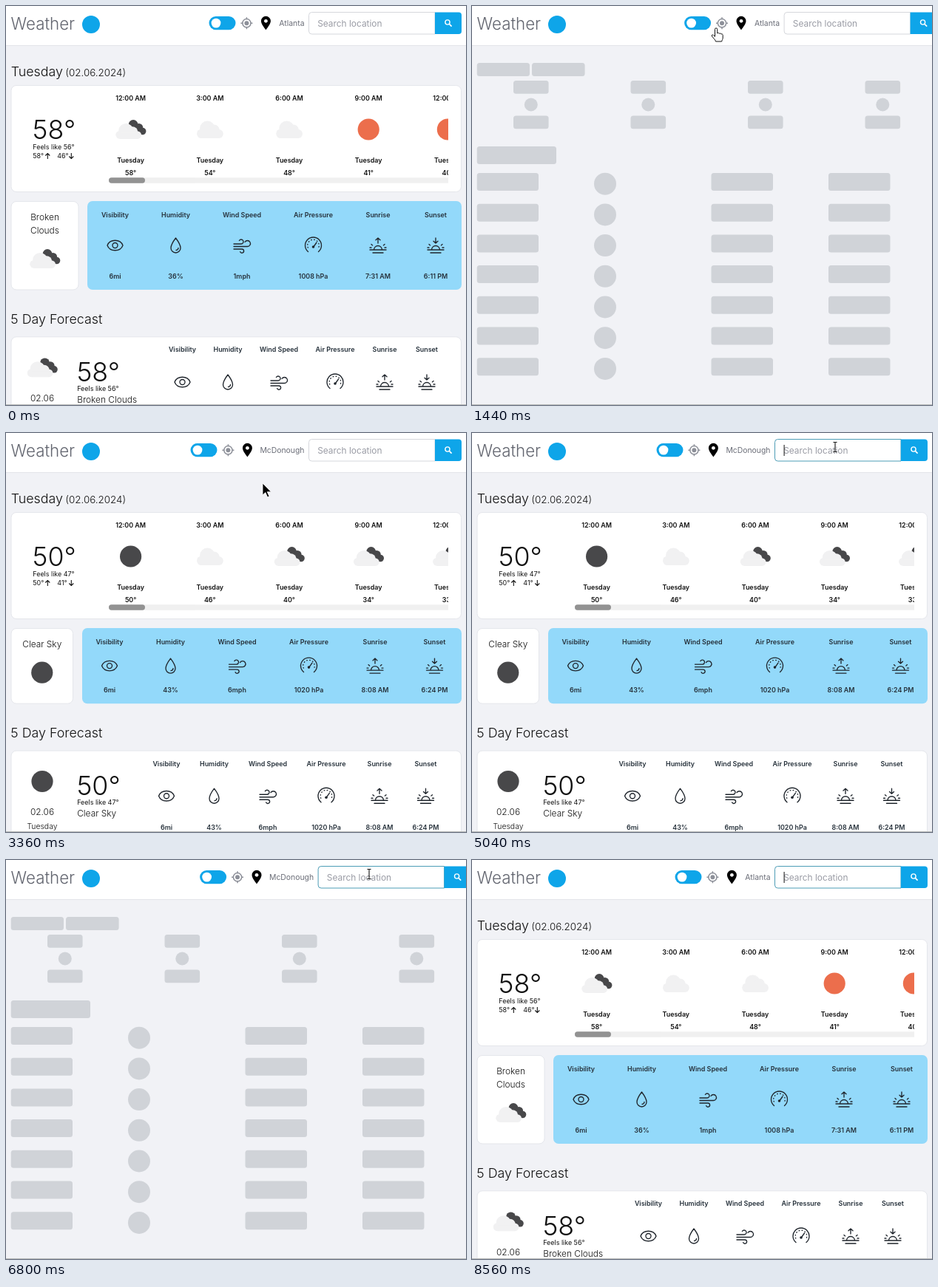
Recreate the animation shown at these times as an HTML page. Size 622x540 px, loop 8640 ms.

```html
<!DOCTYPE html>
<html lang="en">
<head>
<meta charset="utf-8">
<title>Weather</title>
<style>
html, body { margin: 0; width: 100%; height: 100%; overflow: hidden; background: #f1f2f6; }
svg { display: block; font-family: Inter, Roboto, sans-serif; }
.big { font-size: 35.7px; font-weight: 300; }
.h1 { font-size: 22.3px; font-weight: 300; }
.h2 { font-size: 17.85px; font-weight: 300; }
.date { font-size: 13.4px; font-weight: 300; }
.base { font-size: 11.9px; font-weight: 300; }
.field { font-size: 11.9px; }
.sm { font-size: 10.4px; }
.light { font-size: 10.4px; font-weight: 300; }
.xs { font-size: 8.93px; }
.bold { font-size: 8.93px; font-weight: 600; }
.mid { text-anchor: middle; }
.line { fill: none; stroke: #20262d; stroke-width: 1.35; stroke-linecap: round; stroke-linejoin: round; }
.card { fill: #fff; stroke: #e4e6eb; stroke-width: 1; }
</style>
</head>
<body>
<svg id="stage" width="622" height="540" viewBox="0 0 622 540"></svg>
<script>
const LOOP = 8640, STEP = 80, BLUE = '#0ea5e9';
const SKELETON = [[1280, 2240], [6560, 7040]];
const LOCAL = [2960, 7280];            // second city is shown
const FOCUS = 4960;
const KEYS = [5200, 5360, 5520, 5680, 5840, 5920, 6080];
const MENU = [6320, 6560];
const CARET_OFF = [[6800, 7280], [7760, 8320]];
const PATH = [
  [80, 455, 530], [560, 350, 62], [720, 346, 56], [960, 344, 52], [1280, 330, 30],
  [2160, 330, 30], [2320, 338, 36], [2720, 347, 68], [3440, 347, 68],
  [3840, 440, 10], [4160, 491, 19], [7200, 491, 19], [8080, 548, 556]
];

const rect = (x, y, w, h, r, fill, more = '') =>
  `<rect x="${x}" y="${y}" width="${w}" height="${h}" rx="${r}" fill="${fill}" ${more}/>`;
const dot = (x, y, r, fill) => `<circle cx="${x}" cy="${y}" r="${r}" fill="${fill}"/>`;
const text = (x, y, cls, s, fill = '#111') => `<text x="${x}" y="${y}" class="${cls}" fill="${fill}">${s}</text>`;
const at = (x, y, body) => `<g transform="translate(${x} ${y})">${body}</g>`;
const card = (x, y, w, h) => `<rect class="card" x="${x}" y="${y}" width="${w}" height="${h}" rx="7"/>`;
const line = d => `<path class="line" d="${d}"/>`;

// Weather pictures, centred on 0,0
const cloud = fill => dot(-11.5, 5.7, 6.3, fill) + dot(-3.5, -1.2, 10.2, fill) + dot(5.5, 1, 7.5, fill) +
  dot(12, 6, 6, fill) + rect(-11.5, 3, 23.5, 9, 0, fill);
const DARK = '#48484a', PALE = '#f1f1f2';
const sky = {
  sun: dot(0, 0, 14.6, '#ec6e4c'),
  night: dot(0, 0, 14.6, DARK),
  cloud: cloud(PALE),
  broken: dot(3.5, -6.5, 6.4, DARK) + dot(11, -2.5, 5.6, DARK) + dot(16, 2.5, 4.8, DARK) +
    rect(4, -4, 10, 11, 3, DARK) + at(-3, 2.2, `<g transform="scale(.97 .9)">${cloud(PALE)}</g>`)
};

// Line icons, centred on 0,0
const horizon = 'M-11 6H11M-7 10H7M-5.5 6A5.5 5.5 0 0 1 5.5 6M-9-1.5l1.6 1.4M9-1.5l-1.6 1.4M-11 3h2M9 3h2';
const icons = [
  line('M-10.5 0C-7-9 7-9 10.5 0C7 9-7 9-10.5 0Z') + '<circle class="line" r="3.5"/>',
  line('M0-10C3-6 6.5-1 6.5 3.5A6.5 6.5 0 0 1-6.5 3.5C-6.5-1-3-6 0-10ZM3.5 3.5A3.2 3.2 0 0 1 .5 6.5'),
  line('M-11-2H-1A3 3 0 1 0-3.6-6.5M-11 1.5H7.5A4 4 0 1 0 4-4.5M-11 5H0A2.6 2.6 0 1 1-2.4 8.6'),
  line('M-7 8.5A11 11 0 1 1 7 8.5M1 1L4.5-4') + dot(0, 2, 1.8, '#20262d') +
    '<path class="line" stroke-dasharray=".6 3.5" d="M-7.2 3A7.8 7.8 0 1 1 7.2 3"/>',
  line(horizon + 'M0-3V-10M-3-7.2L0-10L3-7.2'),
  line(horizon + 'M0-10V-3M-3-5.8L0-3L3-5.8')
];
const LABELS = ['Visibility', 'Humidity', 'Wind Speed', 'Air Pressure', 'Sunrise', 'Sunset'];

const stats = (xs, values, label, icon, value) => xs.map((x, i) =>
  text(x, label + 3.2, 'bold mid', LABELS[i], '#26313b') + at(x, icon, icons[i]) +
  text(x, value + 3.2, 'bold mid', values[i], '#26313b')).join('');

const cities = [
  {
    name: 'Atlanta', shift: 0, temp: 58, feels: 56, low: 46, sky: 'broken', words: ['Broken', 'Clouds'],
    temps: [58, 54, 48, 41, 40], skies: ['broken', 'cloud', 'cloud', 'sun', 'sun'],
    values: ['6mi', '36%', '1mph', '1008 hPa', '7:31 AM', '6:11 PM'],
    side: 98, left: 110, bottom: 384,
    cols: [147.5, 229.5, 319, 415.5, 503, 581], days: [238.5, 300, 369, 445, 512, 569]
  },
  {
    name: 'McDonough', shift: -25, temp: 50, feels: 47, low: 41, sky: 'night', words: ['Clear Sky'],
    temps: [50, 46, 40, 34, 33], skies: ['night', 'cloud', 'broken', 'broken', 'broken'],
    values: ['6mi', '43%', '6mph', '1020 hPa', '8:08 AM', '6:24 PM'],
    side: 90.5, left: 103, bottom: 366.2,
    cols: [140, 222.5, 312.5, 409.5, 499, 579.5], days: [217, 281.5, 354, 433, 505, 567.5]
  }
];
const HOURS = ['12:00 AM', '3:00 AM', '6:00 AM', '9:00 AM', '12:00 PM'];

function page(c) {
  const hours = HOURS.map((h, i) => {
    const x = 168.6 + i * 107.2;
    return text(x, 128.2, 'bold mid', h) + at(x, 167, sky[c.skies[i]]) +
      text(x, 211.6, 'bold mid', 'Tuesday') + text(x, 229.4, 'bold mid', c.temps[i] + '°');
  }).join('');
  const mid = (264 + c.bottom) / 2, center = (7 + c.side) / 2;
  const arrow = (x, d) => `<path d="${d}" transform="translate(${x} 203)" fill="none" stroke="#111" stroke-width="1.1"/>`;
  const forecast = card(7, 447.8, 608.5, 120) + at(49, 489.3, sky[c.sky]) +
    text(95.7, 507.5, 'big', c.temp + '°') + text(96.2, 521.2, 'xs', `Feels like ${c.feels}°`) +
    text(96.2, 537.2, 'base', c.words.join(' ')) + text(49, 535.2, 'base mid', '02.06') +
    text(49, 553.5, 'light mid', 'Tuesday') + stats(c.days, c.values, 465.2, 509, 551.3);
  return text(6.7, 95.4, 'h2', 'Tuesday') + text(80.3, 94.8, 'date', '(02.06.2024)') +
    card(7, 107.5, 608.5, 144) +
    text(35.8, 180, 'big', c.temp + '°') + text(36.3, 194.2, 'xs', `Feels like ${c.feels}°`) +
    text(36.3, 206.2, 'xs', c.temp + '°') + arrow(56.3, 'M0 4V-3.5M-3-.5L0-3.5L3-.5') +
    text(69.3, 206.2, 'xs', c.low + '°') + arrow(88.3, 'M0-4V3.5M-3 .5L0 3.5L3 .5') +
    `<g clip-path="url(#hours)">${hours}${rect(139, 232.3, 465, 7.4, 3.7, '#f0f0f0')}</g>` +
    rect(139, 232.3, 49, 7.4, 3.7, '#929292') +
    card(7, 264.5, c.side - 7, c.bottom - 264.5) +
    c.words.map((w, i) => text(center, 289.8 + i * 17.8, 'base mid', w)).join('') +
    at(center, c.words.length * 17.8 + 306.4, sky[c.sky]) +
    rect(c.left, 264, 616 - c.left, c.bottom - 264, 7, '#93d9fa') +
    stats(c.cols, c.values, 282.4, mid, c.bottom - 18.2) +
    at(0, c.bottom - 384, text(6.3, 429.8, 'h2', '5 Day Forecast') + forecast);
}

function skeleton() {
  const GREY = '#d0d3d8', box = (x, y, w, h) => rect(x, y, w, h, 3.5, GREY);
  let out = box(6.7, 77, 71.3, 18) + box(81, 77, 71.6, 18) + box(6.7, 190, 107.3, 24);
  for (let i = 0; i < 4; i++) {
    const x = 56 + i * 158.5;
    out += box(x, 101, 47.6, 17.7) + dot(x + 23.8, 133.5, 9, GREY) + box(x, 148.5, 47.6, 17.7);
  }
  for (let i = 0; i < 7; i++) {
    const y = 226 + i * 41.7;
    out += box(6.7, y, 83.3, 24) + dot(180, y + 14.7, 15, GREY) + box(323.5, y, 83.5, 24) + box(482, y, 83.5, 24);
  }
  return out;
}

const place = c => `<g id="${c.name}">` + at(c.shift, 0,
  rect(274.5, 14, 36, 18.2, 9.1, BLUE) + dot(284, 23.1, 6.4, '#fff') +
  at(325.4, 23.2, '<path d="M0-8V-5M0 8V5M-8 0H-5M8 0H5" stroke="#8d9099" stroke-width="1.5"/>' +
    '<circle r="5.6" fill="none" stroke="#8d9099" stroke-width="1.5"/>' + dot(0, 0, 3, '#8d9099')) +
  at(351.4, 20.3, '<path d="M0 12.3C-2.4 8.6-6.5 4-6.5 0A6.5 6.5 0 0 1 6.5 0C6.5 4 2.4 8.6 0 12.3Z"/>' + dot(0, 0, 2.4, '#fff'))) +
  text(403.5, 27.1, 'sm', c.name, '#6b6e78').replace('<text', '<text text-anchor="end"') + '</g>';

const stage = document.getElementById('stage');
stage.innerHTML = `<clipPath id="hours"><rect x="139" y="110" width="459" height="132"/></clipPath>` +
  rect(0, 0, 622, 540, 0, '#f1f2f6') +
  cities.map((c, i) => `<g id="page${i}">${page(c)}</g>`).join('') +
  `<g id="bones">${skeleton()}</g>` +
  rect(0, 0, 622, 53, 0, '#fff') + rect(0, 53, 622, 1, 0, '#e3e5e9') +
  text(6.6, 31.6, 'h1', 'Weather', '#62656f') + dot(115, 25, 12, BLUE) +
  '<g id="bar">' + cities.map(place).join('') +
  '<path id="box" d="M580 8.5H413.5a4 4 0 0 0-4 4V34a4 4 0 0 0 4 4H580Z" fill="#fff"/>' +
  `<path d="M580 8.5H612a4 4 0 0 1 4 4V34a4 4 0 0 1-4 4H580Z" fill="${BLUE}"/>` +
  '<path d="M599.6 24.6l3 3" stroke="#fff" stroke-width="1.6"/>' +
  '<circle cx="597" cy="22" r="3.1" fill="none" stroke="#fff" stroke-width="1.4"/>' +
  '<text id="query" x="421.2" y="27.5" class="field"></text>' + rect(421.6, 16, 1, 15, 0, '#111', 'id="caret"') + '</g>' +
  '<g id="menu">' + rect(409.5, 41.5, 148.5, 125.5, 4, '#fff', 'stroke="#d8dae0"') +
  [0, 1, 2, 3].map(i => text(418.5, 64.2 + i * 26.7, 'field', 'Atlanta')).join('') + '</g>' +
  rect(0, 539, 622, 1, 0, '#b9bbb9') +
  '<g id="pointer">' +
  '<path id="arrow" d="M0 0V16L3.8 12.6L6.6 18.8L9 17.7L6.2 11.7H11.5Z" fill="#000" stroke="#fff" stroke-width=".8"/>' +
  '<path id="hand" d="M-1.5 1.5a1.6 1.6 0 0 1 3.2 0V7c.8-1 2.5-.7 2.7.4.9-.8 2.3-.4 2.5.7 1-.6 2.3 0 2.3 1.3V13c0 2-1.2 3-1.5 5H-.5c-.5-2.4-3-4.3-5-7-1-1.7.6-2.7 2-1.6l2 1.9Z" fill="#fff" stroke="#111"/>' +
  '<path id="beam" d="M-2.5-6.5H-.8L0-6L.8-6.5H2.5M0-6V6M-2.5 6.5H-.8L0 6L.8 6.5H2.5" fill="none" stroke="#111" stroke-width="1.1"/>' +
  '</g>';

const $ = id => document.getElementById(id);
const show = (id, on) => $(id).setAttribute('display', on ? 'inline' : 'none');
const within = (t, [a, b]) => t >= a && t < b;

function pointer(t) {
  const i = PATH.findIndex(p => p[0] > t);
  if (i <= 0) return i ? PATH[PATH.length - 1].slice(1) : [0, -60];
  const [t0, x0, y0] = PATH[i - 1], [t1, x1, y1] = PATH[i];
  const k = (t - t0) / (t1 - t0), e = k * k * (3 - 2 * k);
  return [x0 + (x1 - x0) * e, y0 + (y1 - y0) * e];
}

function draw(now) {
  let t = now % LOOP;
  t -= t % STEP;
  const loading = SKELETON.some(s => within(t, s)), city = within(t, LOCAL) ? 1 : 0;
  cities.forEach((c, i) => {
    show('page' + i, !loading && i === city);
    show(c.name, i === city);
  });
  show('bones', loading);
  show('menu', within(t, MENU));
  $('bar').setAttribute('transform', `translate(${loading ? 12.6 : 0} 0)`);

  const focus = t >= FOCUS;
  const typed = t < MENU[1] ? 'atlanta'.slice(0, KEYS.filter(k => k <= t).length) : '';
  const query = $('query');
  query.textContent = typed || 'Search location';
  query.setAttribute('fill', typed ? '#222' : '#9a9ca5');
  $('box').setAttribute('stroke', focus ? '#4d9db6' : '#d5d7dc');
  show('caret', focus && !CARET_OFF.some(s => within(t, s)));
  $('caret').setAttribute('x', typed ? 421.2 + query.getComputedTextLength() : 421.6);

  const [x, y] = pointer(t);
  const beam = x > 410 && x < 580 && y > 7 && y < 39, hand = within(t, [1200, 2240]);
  show('beam', beam);
  show('hand', hand);
  show('arrow', !beam && !hand);
  $('pointer').setAttribute('transform', `translate(${x} ${y})`);
}

let start;
function tick(now) {
  start ??= now;
  draw(now - start);
  requestAnimationFrame(tick);
}
draw(0);
requestAnimationFrame(tick);
</script>
</body>
</html>
```
